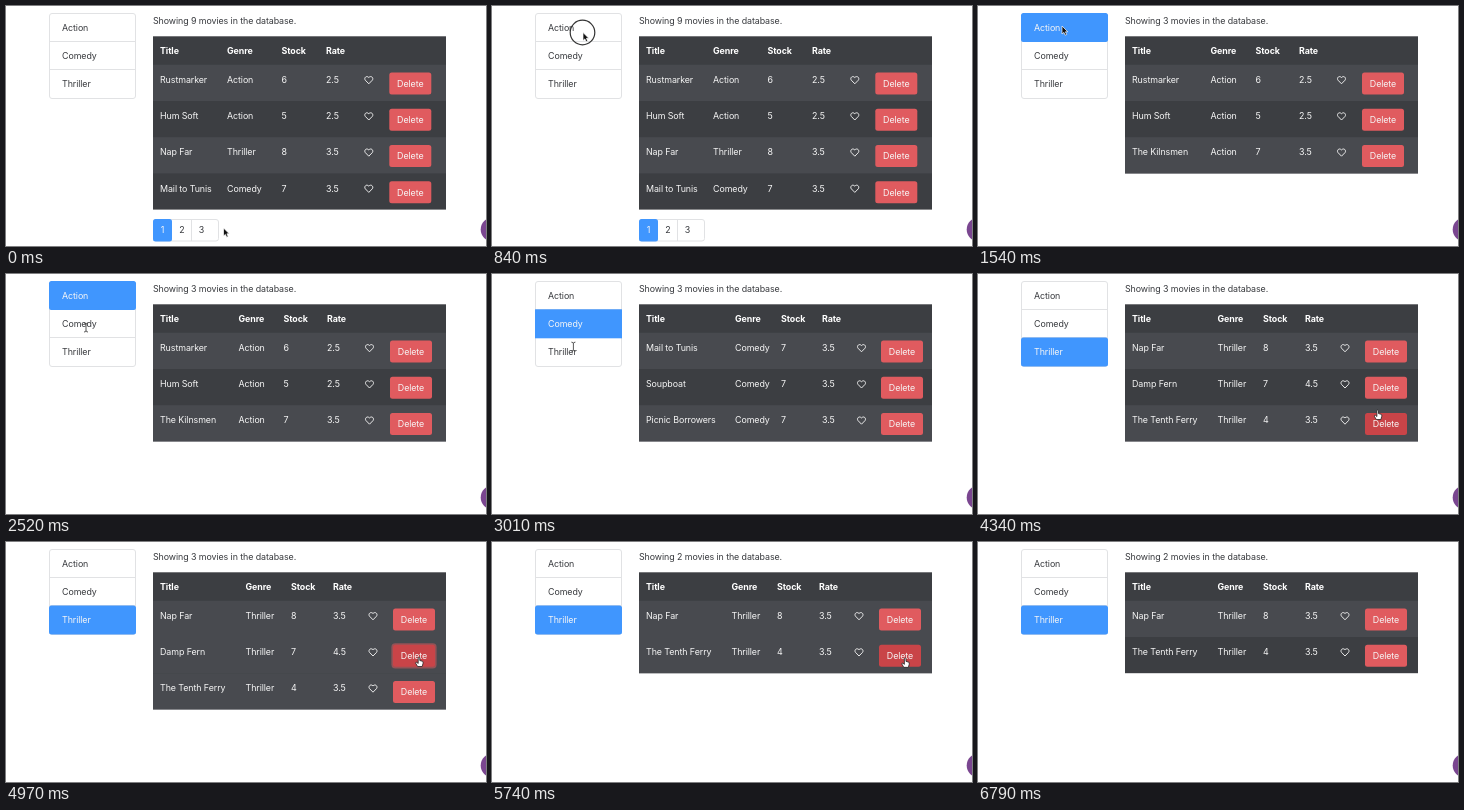
Animation, 480 px wide and 240 px high, one loop 6.86 s. Source, as an HTML page:

```html
<!DOCTYPE html>
<html lang="en">
<head>
<meta charset="utf-8">
<title>Movie list</title>
<style>
  html, body { margin: 0; width: 100%; height: 100%; overflow: hidden; background: #fff; }
  svg { display: block; width: 480px; height: 240px; }
  text { font: 8.9px Inter, "Open Sans", sans-serif; letter-spacing: -.01em; fill: #383a3e; }
  .light { fill: #f6f6f6; }
  .head { fill: #fff; font-weight: 700; }
  .mid { text-anchor: middle; }
  .line { fill: none; stroke: #e1e2e4; }
  .heart { fill: none; stroke: #f2f2f2; stroke-width: .95; stroke-linejoin: round; }
</style>
</head>
<body>
<svg viewBox="0 0 480 240">
  <g id="page"></g>
  <circle cx="486.7" cy="223.5" r="12" fill="#7a4690"/>
  <circle id="ring" r="12.3" fill="none" stroke="#333" stroke-width="1.2"/>
  <g id="cursor">
    <path id="arrow" d="M0 0V8L1.9 6.4L3.2 9.2L4.7 8.5L3.4 5.8H5.8Z" fill="#111" stroke="#fff" stroke-width=".7"/>
    <path id="beam" d="M-2-4.5Q0-4.5 0-3Q0-4.5 2-4.5M0-3V3M-2 4.5Q0 4.5 0 3Q0 4.5 2 4.5" fill="none" stroke="#444" stroke-width=".9"/>
    <path id="hand" d="M-.8-3Q0-4 .8-3V0L3.6.8Q4.4 1.2 4 3L3.2 6H-1.4L-3.4 2.6Q-3.4 1.4-2.2 1.8L-.8 3Z" fill="#fff" stroke="#222" stroke-width=".8"/>
  </g>
</svg>
<script>
const LOOP = 6860, BLUE = '#4096fe';
const GENRES = ['Action', 'Comedy', 'Thriller'];
const MOVIES = [
  ['Rustmarker', 'Action', 6, '2.5'],
  ['Hum Soft', 'Action', 5, '2.5'],
  ['Nap Far', 'Thriller', 8, '3.5'],
  ['Mail to Tunis', 'Comedy', 7, '3.5'],
  ['Soupboat', 'Comedy', 7, '3.5'],
  ['Picnic Borrowers', 'Comedy', 7, '3.5'],
  ['Damp Fern', 'Thriller', 7, '4.5'],
  ['The Tenth Ferry', 'Thriller', 4, '3.5'],
  ['The Kilnsmen', 'Action', 7, '3.5']
];
const ofGenre = genre => MOVIES.filter(m => m[1] === genre);

// cols: title, genre, stock, rate, heart, button
const VIEWS = [
  { from: 0, count: 9, rows: MOVIES.slice(0, 4), cols: [154, 221, 275.5, 320, 358.3, 383.3] },
  { from: 1050, genre: 'Action', cols: [154, 232.5, 277.5, 321, 359, 384] },
  { from: 2590, genre: 'Comedy', cols: [154, 243, 289, 330, 365, 389] },
  { from: 3430, genre: 'Thriller', cols: [154, 239.5, 285, 327, 362.5, 387] },
  { from: 5040, genre: 'Thriller', removed: 'Damp Fern', cols: [154, 239.5, 285, 327, 362.5, 387] }
];
for (const v of VIEWS) {
  v.rows ??= ofGenre(v.genre).filter(m => m[0] !== v.removed);
  v.count ??= v.rows.length;
}

// start, end, x, y
const MOVES = [
  [0, 0, 217.5, 222], [35, 630, 91, 26.5], [1050, 1540, 84, 20],
  [2100, 2500, 80, 53.5], [2770, 3150, 82, 81], [3680, 3920, 395, 147],
  [4130, 4760, 413, 118.5], [5710, 6370, 440, 254]
];
const CLICKS = [840, 2380, 3290, 4830];

const $ = id => document.getElementById(id);
const text = (x, y, s, cls = '') => `<text x="${x}" y="${y}" class="${cls}">${s}</text>`;
const rect = (x, y, w, h, fill, rx = 0) =>
  `<rect x="${x}" y="${y}" width="${w}" height="${h}" rx="${rx}" fill="${fill}"/>`;
const line = d => `<path class="line" d="${d}"/>`;
const outline = (x, y, w, h) =>
  `<rect class="line" x="${x}" y="${y}" width="${w}" height="${h}" rx="2.5"/>`;

function pointerAt(t) {
  let [, , x, y] = MOVES[0];
  for (const [start, end, toX, toY] of MOVES.slice(1)) {
    const p = Math.min(1, Math.max(0, (t - start) / (end - start)));
    const ease = p * p * (3 - 2 * p);
    x += (toX - x) * ease;
    y += (toY - y) * ease;
  }
  return { x, y };
}

function sidebar(active) {
  return outline(43.5, 7.5, 86, 85) + line('M44 35.5H129M44 63.5H129') +
    GENRES.map((g, i) => {
      const on = g === active;
      return (on ? rect(43, 7 + 28.3 * i, 87, 29, BLUE, i === 1 ? 0 : 2.5) : '') +
        text(56, 25 + 28.2 * i, g, on ? 'light' : '');
    }).join('');
}

function pager() {
  return outline(147.5, 213.5, 65, 21.5) + line('M185.5 214V235') +
    rect(147, 213, 19, 22.5, BLUE, 2.5) +
    [1, 2, 3].map(n => text(137 + 19.5 * n, 227.3, n, n === 1 ? 'mid light' : 'mid')).join('');
}

function table({ rows, cols }, hoverRow, overButton, focused) {
  let out = rect(147, 30.3, 293, 28.5 + 36.2 * rows.length, '#3c3e42');
  ['Title', 'Genre', 'Stock', 'Rate'].forEach((s, i) => out += text(cols[i], 48.3, s, 'head'));
  rows.forEach((movie, i) => {
    const y = 58.8 + 36.2 * i, hot = overButton && i === hoverRow;
    if (i % 2 === 0 || i === hoverRow) out += rect(147, y, 293, 36.2, '#484a4f');
    movie.forEach((s, c) => out += text(cols[c], y + 18.2, s, 'light'));
    out += `<path class="heart" transform="translate(${cols[4]} ${y + 11})"
      d="M4.5 8L1 4.4C-.6 2.4 1.9-.8 4.5 1.7C7.1-.8 9.6 2.4 8 4.4Z"/>`;
    if (hot && focused) out += rect(cols[5] - 1.6, y + 6.2, 45.2, 25.2, '#e05a5f80', 4);
    out += rect(cols[5], y + 7.8, 42, 22, hot ? '#c94448' : '#e05b5f', 2.5) +
      text(cols[5] + 21, y + 22.1, 'Delete', 'light mid');
  });
  return out;
}

let shown = '';
function draw(t) {
  const view = VIEWS.findLast(v => t >= v.from);
  const { x, y } = pointerAt(t);
  const inTable = x > 147 && x < 440 && y > 58.8;
  const row = inTable ? Math.floor((y - 58.8) / 36.2) : -1;
  const offset = y - 58.8 - 36.2 * row;
  const overButton = row >= 0 && row < view.rows.length &&
    x > view.cols[5] && x < view.cols[5] + 42 && offset > 7.8 && offset < 29.8;

  const html = text(147, 17.8, `Showing ${view.count} movies in the database.`) +
    sidebar(view.genre) + table(view, row, overButton, t >= 4830 && t < 5040) +
    (view.count > 4 ? pager() : '');
  if (html !== shown) $('page').innerHTML = shown = html;

  const overText = x > 56 && x < 90 && y > 43 && y < 87;
  const kind = overButton ? 'hand' : overText ? 'beam' : 'arrow';
  for (const id of ['arrow', 'beam', 'hand']) $(id).style.display = id === kind ? '' : 'none';
  $('cursor').setAttribute('transform', `translate(${x} ${y})`);

  const clicking = CLICKS.some(c => t >= c && t < c + 70);
  $('ring').style.display = clicking ? '' : 'none';
  $('ring').setAttribute('cx', x - .5);
  $('ring').setAttribute('cy', y);
}

function tick() {
  draw(performance.now() % LOOP);
  requestAnimationFrame(tick);
}
tick();
</script>
</body>
</html>
```
